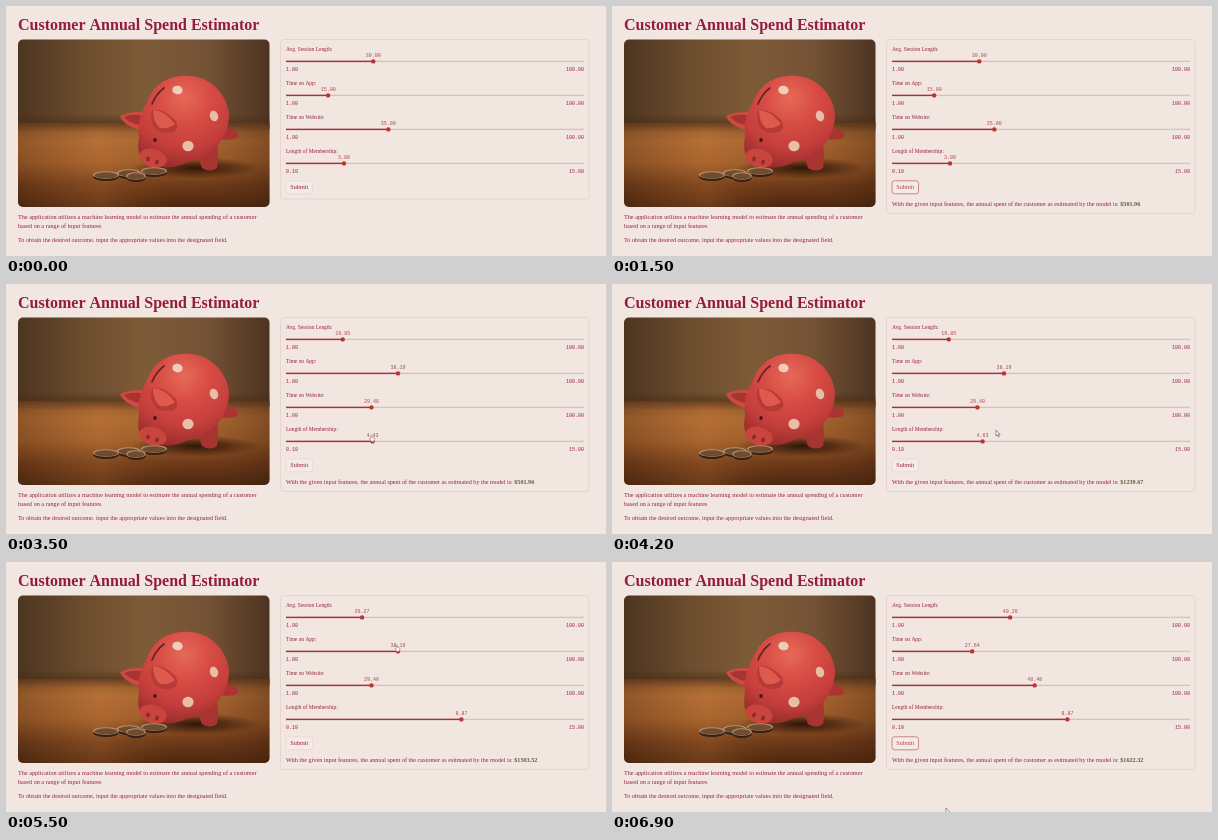
An HTML page with a canvas that plays this animation: 600 by 250 pixels, repeating every 7 s.

```html
<!DOCTYPE html>
<html lang="en">
<head>
<meta charset="utf-8">
<title>Customer Annual Spend Estimator</title>
<style>
html, body { margin: 0; width: 100%; height: 100%; overflow: hidden; background: #f2e6e1; }
canvas { display: block; width: 600px; height: 250px; }
</style>
</head>
<body>
<canvas id="stage"></canvas>
<script>
const canvas = document.getElementById('stage');
const ctx = canvas.getContext('2d');
const ratio = window.devicePixelRatio || 1;
canvas.width = 600 * ratio;
canvas.height = 250 * ratio;

const LOOP = 7000, STEP = 100;
const INK = '#982040', RED = '#ac4350', PAPER = '#f2e6e1';
const SERIF = '"Liberation Serif", serif', MONO = '"Liberation Mono", monospace';
const TRACK = { left: 280, width: 298, top: 55.4, gap: 34 };

const sliders = [
  { label: 'Avg. Session Length:', min: 1, max: 100, start: 30 },
  { label: 'Time on App:', min: 1, max: 100, start: 15 },
  { label: 'Time on Website:', min: 1, max: 100, start: 35 },
  { label: 'Length of Membership:', min: 0.1, max: 15, start: 3 }
];

// Times are in seconds.
const drags = [
  { from: 1.9, to: 2.2, slider: 2, value: 22.71 },
  { from: 2.4, to: 2.7, slider: 1, value: 38.19 },
  { from: 2.8, to: 3.0, slider: 2, value: 29.40 },
  { from: 3.1, to: 3.3, slider: 0, value: 19.85 },
  { from: 3.4, to: 3.6, slider: 3, value: 4.63 },
  { from: 4.3, to: 4.5, slider: 3, value: 6.22 },
  { from: 4.6, to: 4.8, slider: 0, value: 26.27 },
  { from: 5.2, to: 5.35, slider: 3, value: 8.87 },
  { from: 5.5, to: 5.7, slider: 1, value: 27.64 },
  { from: 5.9, to: 6.15, slider: 2, value: 48.40 },
  { from: 6.25, to: 6.45, slider: 0, value: 40.26 }
];
const results = [[0.9, '$501.96'], [3.8, '$1239.67'], [5.1, '$1503.52'], [6.7, '$1622.32']];
const buttonActive = [[0.8, 1.8], [3.7, 4.0], [4.9, 5.2], [6.6, 7]];

const rowY = i => TRACK.top + TRACK.gap * i;
const thumbX = (s, v) => TRACK.left + TRACK.width * (v - s.min) / (s.max - s.min);
const during = (t, ranges) => ranges.some(([a, b]) => t >= a && t < b);

function valueAt(index, t) {
  let value = sliders[index].start;
  for (const d of drags) {
    if (d.slider !== index || t < d.from) continue;
    const p = Math.min(1, (t - d.from) / (d.to - d.from));
    value += (d.value - value) * (1 - (1 - p) ** 3);
  }
  return value;
}

const cursorPath = [
  [0.2, 320, 262], [0.8, 297, 184], [1.0, 297, 184], [1.4, 310, 262], [1.65, 400, 262],
  [3.75, 296, 184], [3.9, 296, 184], [4.2, 384, 146],
  [4.93, 301, 188], [5.0, 301.5, 189], [5.1, 298, 184],
  [6.6, 297, 184], [6.75, 297, 184], [6.9, 334, 246], [7, 340, 260]
];
for (const d of drags) {
  for (const time of [d.from, d.to]) {
    cursorPath.push([time, thumbX(sliders[d.slider], valueAt(d.slider, time)) - 1, rowY(d.slider) - 6]);
  }
}
cursorPath.sort((a, b) => a[0] - b[0]);

function text(str, x, y, size, { color = INK, font = SERIF, weight = 'normal', align = 'left' } = {}) {
  ctx.font = `${weight} ${size}px ${font}`;
  ctx.fillStyle = color;
  ctx.textAlign = align;
  ctx.fillText(str, x, y);
}

function roundBox(x, y, w, h, r, fill, stroke, line = 0.8) {
  ctx.beginPath();
  ctx.roundRect(x, y, w, h, r);
  if (fill) { ctx.fillStyle = fill; ctx.fill(); }
  if (stroke) { ctx.strokeStyle = stroke; ctx.lineWidth = line; ctx.stroke(); }
}

function oval(x, y, rx, ry, turn, fill) {
  ctx.beginPath();
  ctx.ellipse(x, y, rx, ry, turn, 0, Math.PI * 2);
  ctx.fillStyle = fill;
  ctx.fill();
}

function shape(path, fill) {
  ctx.fillStyle = fill;
  ctx.fill(new Path2D(path));
}

function gradient(g, ...colors) {
  colors.forEach((c, i) => g.addColorStop(i / (colors.length - 1), c));
  return g;
}
const linear = (x0, y0, x1, y1, ...c) => gradient(ctx.createLinearGradient(x0, y0, x1, y1), ...c);
const radial = (x, y, r, ...c) => gradient(ctx.createRadialGradient(x, y, 0, x, y, r), ...c);

function drawPicture() {
  ctx.save();
  ctx.beginPath();
  ctx.roundRect(12, 33.5, 251.5, 167.5, 5);
  ctx.clip();
  ctx.fillStyle = linear(12, 0, 264, 0, '#4c3520', '#6b4c2d', '#7e5b38', '#745235', '#4d3421');
  ctx.fillRect(12, 33, 252, 90);
  ctx.fillStyle = linear(0, 112, 0, 201, '#80502a', '#b06c33', '#a2602c', '#6f3b19', '#4b260f');
  ctx.fillRect(12, 117, 252, 85);
  ctx.fillStyle = linear(12, 0, 264, 0, 'rgba(70,38,15,.3)', 'rgba(200,122,58,.25)', 'rgba(110,60,25,0)', 'rgba(60,30,14,.4)');
  ctx.fillRect(12, 117, 252, 85);
  ctx.fillStyle = linear(0, 108, 0, 126, 'rgba(65,38,20,0)', 'rgba(75,44,22,.55)', 'rgba(65,38,20,0)');
  ctx.fillRect(12, 108, 252, 18);

  ctx.save();
  ctx.translate(190, 162);
  ctx.scale(1, 0.17);
  oval(0, 0, 64, 64, 0, radial(0, 0, 64, 'rgba(30,10,4,.85)', 'rgba(40,16,6,.5)', 'rgba(50,20,8,0)'));
  ctx.restore();

  const skin = radial(178, 92, 76, '#e56a58', '#d84d45', '#c53e3b', '#8c2929');
  shape('M188 140 L209 130 Q214 150 211 162 Q204 167 196 162 Z', '#a83431');
  shape('M210 125 Q220 119 230 125 Q235 130 229 133 Q218 135 207 132 Z', '#a93432');
  shape('M141 107 Q127 104 114 110 Q117 119 133 124 Z', '#d14a42');
  shape('M138 110 Q127 107 118 111 Q123 117 133 119 Z', '#a63431');
  shape('M142 94 C149 76 166 68 185 70 C206 72 221 89 223 108 C223 132 207 151 182 156 C169 163 152 163 141 156 C130 149 132 140 133 130 C131 116 136 105 142 94 Z', skin);
  oval(147, 152, 14, 9, 0.28, '#ca443e');
  oval(142, 153, 1.8, 2.6, 0.3, '#872c2a');
  oval(151, 156, 1.8, 2.6, 0.3, '#872c2a');
  shape('M146 104 Q157 102 169 114 Q174 121 168 126 Q157 129 150 124 Q143 116 146 104 Z', '#b63b37');
  shape('M147 104 Q158 104 169 118 Q163 123 154 122 Q147 116 147 104 Z', '#de5a4d');
  oval(149, 134, 1.7, 2.1, 0, '#351b18');
  ctx.strokeStyle = '#68232a';
  ctx.lineWidth = 1.8;
  ctx.lineCap = 'round';
  ctx.beginPath();
  ctx.moveTo(146, 98);
  ctx.quadraticCurveTo(150, 88, 158, 82);
  ctx.stroke();
  oval(171.5, 84, 5.2, 4.3, 0.2, '#f0cdb8');
  oval(208, 110, 4.1, 5.4, -0.3, '#e7bea7');
  oval(182, 140, 5.6, 5.2, 0, '#e8bea6');

  for (const [x, y, r] of [[123, 167, 12], [148, 165, 13], [100, 169, 13], [130, 170, 10]]) {
    oval(x, y + 1.7, r, 4.2, 0, '#342016');
    oval(x, y, r, 3.8, 0, '#b48f6b');
    oval(x, y + 0.3, r - 1.3, 3, 0, '#704c2e');
  }
  ctx.restore();
}

function drawSlider(s, i, t) {
  const y = rowY(i), value = valueAt(i, t), x = thumbX(s, value);
  const end = TRACK.left + TRACK.width;
  text(s.label, TRACK.left, y - 10.6, 5.45);
  ctx.fillStyle = '#d9c1be';
  ctx.fillRect(TRACK.left, y - 0.7, TRACK.width, 1.4);
  ctx.fillStyle = '#a92d3c';
  ctx.fillRect(TRACK.left, y - 0.7, x - TRACK.left, 1.4);
  oval(x, y, 2.2, 2.2, 0, '#bd342f');
  const mono = { font: MONO };
  text(value.toFixed(2), x, y - 4, 5, { ...mono, color: RED, align: 'center' });
  text(s.min.toFixed(2), TRACK.left, y + 9.8, 5, mono);
  text(s.max.toFixed(2), end, y + 9.8, 5, { ...mono, align: 'right' });
}

function drawCursor(t) {
  const next = cursorPath.findIndex(point => point[0] > t);
  if (next < 1) return;
  const [t0, x0, y0] = cursorPath[next - 1], [t1, x1, y1] = cursorPath[next];
  const p = (t - t0) / (t1 - t0);
  const drag = drags.find(d => t >= d.from && t <= d.to);
  let x = x0 + (x1 - x0) * p;
  const y = y0 + (y1 - y0) * p;
  if (drag) x = thumbX(sliders[drag.slider], valueAt(drag.slider, t)) - 1;
  const overButton = x > 280 && x < 307 && y > 174 && y < 191;
  const outline = new Path2D(drag || overButton
    ? 'M-.8 4 V0 Q0 -1 .8 0 V2.5 L3.6 3.3 Q4.4 4 3.8 5.8 L3 8 H-.3 L-2.8 4.8 Q-2.4 3.7 -1.5 4.4 Z'
    : 'M0 0 V6 L1.4 4.8 L2.4 7 L3.3 6.6 L2.4 4.5 H4.2 Z');
  ctx.save();
  ctx.translate(x, y);
  if (drag) ctx.scale(0.75, 0.75);
  ctx.fillStyle = '#fff8f5';
  ctx.strokeStyle = '#685055';
  ctx.lineWidth = 0.6;
  ctx.fill(outline);
  ctx.stroke(outline);
  ctx.restore();
}

function draw(t) {
  ctx.setTransform(ratio, 0, 0, ratio, 0, 0);
  ctx.fillStyle = PAPER;
  ctx.fillRect(0, 0, 600, 250);
  text('Customer Annual Spend Estimator', 12, 24, 16, { weight: 'bold', color: '#941c3c' });
  drawPicture();
  text('The application utilizes a machine learning model to estimate the annual spending of a customer', 12, 213, 6.2);
  text('based on a range of input features', 12, 221.6, 6.2);
  text('To obtain the desired outcome, input the appropriate values into the designated field.', 12, 236, 6.2);

  const result = results.filter(r => t >= r[0]).pop();
  roundBox(274.5, 33.5, 308.5, result ? 174 : 159.5, 3, null, '#e2d1cd');
  sliders.forEach((s, i) => drawSlider(s, i, t));

  const active = during(t, buttonActive);
  roundBox(280, 174.8, 26.5, 13, 2.5, '#f5eae5', active ? '#bd6f78' : '#e6d6d1');
  text('Submit', 293.2, 183.4, 6.2, { align: 'center', color: active ? RED : INK });

  if (result) {
    const lead = 'With the given input features, the annual spent of the customer as estimated by the model is: ';
    text(lead, 280, 200, 6.15);
    text(result[1], 280 + ctx.measureText(lead).width, 200, 6.15, { weight: 'bold', color: '#65583f' });
  }
  drawCursor(t);
}

function tick(now) {
  draw(Math.floor((now % LOOP) / STEP) * STEP / 1000);
  requestAnimationFrame(tick);
}
draw(0);
requestAnimationFrame(tick);
</script>
</body>
</html>
```
